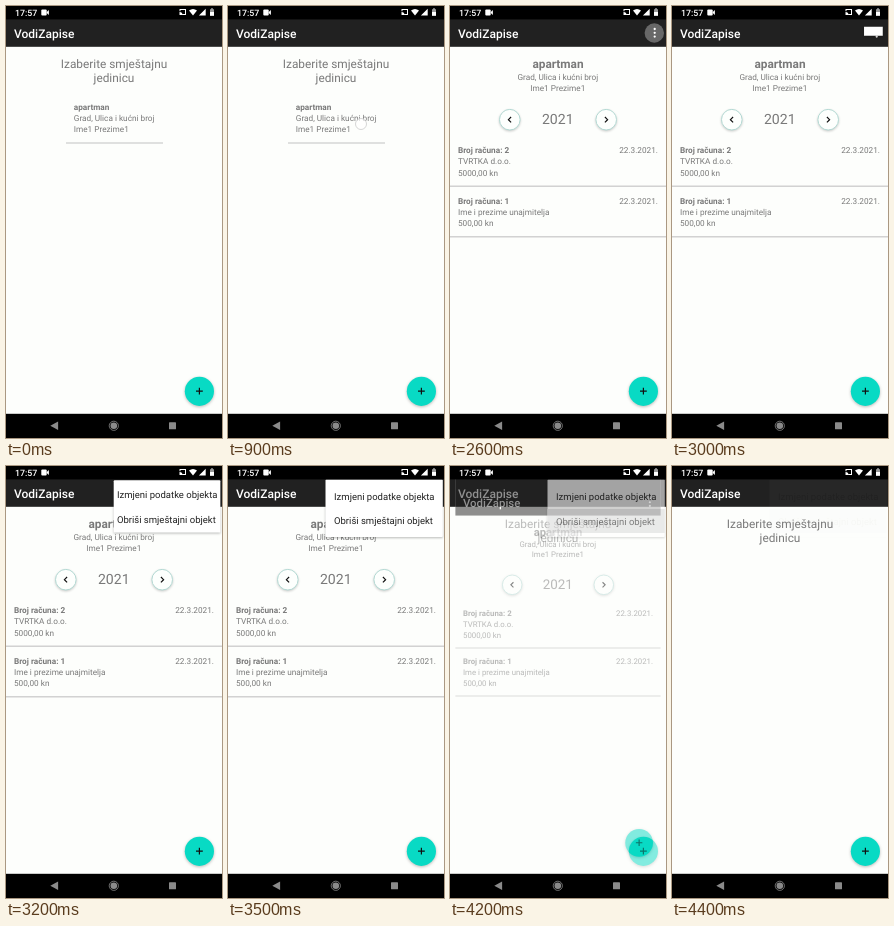
An HTML page that plays this animation: 216x432 px, repeating every 4500 ms.

```html
<!DOCTYPE html>
<html lang="hr">
<head>
<meta charset="utf-8">
<title>VodiZapise</title>
<style>
  html, body { margin: 0; width: 100%; height: 100%; overflow: hidden; background: #000; }
  svg { display: block; width: 100%; height: 100%; }
  text { font: 8.22px Roboto, sans-serif; fill: #797979; text-rendering: geometricPrecision; }
  .bold { font-weight: 700; }
  .mid { text-anchor: middle; }
  .end { text-anchor: end; }
  .big { font-size: 11.85px; }
  .year { font-size: 14.1px; }
  .title { font-size: 12px; font-weight: 500; fill: #fff; }
  .clock { font-size: 8.8px; font-weight: 500; fill: #fff; }
  .option { font-size: 9.5px; fill: #222; }
  .fab { filter: drop-shadow(0 1.5px 1.5px #0004); }
  .round { fill: #fdfffd; stroke: #b3d9d3; filter: drop-shadow(0 1px 1px #0003); }
  .stroke { fill: none; stroke: #111; stroke-width: 1.2; }
  #menu { filter: drop-shadow(0 1px 1px #0004); }
</style>
</head>
<body>
<svg viewBox="0 0 216 432">
  <defs>
    <g id="page">
      <rect width="216" height="432" fill="#fdfefc"/>
      <rect width="216" height="40.8" fill="#212121"/>
      <text class="title" x="8" y="31.5">VodiZapise</text>
    </g>
    <g id="add">
      <circle class="fab" cx="193.4" cy="385.3" r="14.6" fill="#08dac4"/>
      <path class="stroke" d="M190 385.2h6.8M193.4 381.8v6.8"/>
    </g>
    <clipPath id="clip"><rect id="frame" x="97.5" y="13.5" width="117.3" height="57.5" rx="1"/></clipPath>
  </defs>

  <g id="list">
    <use href="#page"/>
    <text class="big mid" x="108" y="62">Izaberite smještajnu</text>
    <text class="big mid" x="108" y="75.7">jedinicu</text>
    <g id="item">
      <text class="bold" x="67.8" y="104">apartman</text>
      <text x="67.8" y="115.3">Grad, Ulica i kućni broj</text>
      <text x="67.8" y="126.4">Ime1 Prezime1</text>
      <rect x="60" y="136.2" width="97" height="1.6" fill="#d9d9d9"/>
    </g>
    <use href="#add"/>
    <circle id="touch" cx="133" cy="118" r="5.5" fill="#fffb" stroke="#ccc" stroke-width=".8"/>
  </g>

  <g id="detail">
    <use href="#page"/>
    <circle id="ripple" cx="204.3" cy="27" r="9.7" fill="#fff"/>
    <g fill="#fff">
      <circle cx="204.7" cy="23" r="1.15"/>
      <circle cx="204.7" cy="26.8" r="1.15"/>
      <circle cx="204.7" cy="30.6" r="1.15"/>
    </g>
    <text class="big bold mid" x="108" y="62">apartman</text>
    <text class="mid" x="107.8" y="73.8">Grad, Ulica i kućni broj</text>
    <text class="mid" x="107.8" y="84.8">Ime1 Prezime1</text>
    <circle class="round" cx="59.8" cy="113.7" r="10.3"/>
    <circle class="round" cx="156.2" cy="113.7" r="10.3"/>
    <path class="stroke" d="M61.1 111l-2.7 2.7 2.7 2.7M154.9 111l2.7 2.7-2.7 2.7"/>
    <text class="year mid" x="107.8" y="118.2">2021</text>
    <text class="bold" x="8" y="147">Broj računa: 2</text>
    <text class="end" x="208" y="147">22.3.2021.</text>
    <text x="8" y="158.3">TVRTKA d.o.o.</text>
    <text x="8" y="169.5">5000,00 kn</text>
    <text class="bold" x="8" y="197.5">Broj računa: 1</text>
    <text class="end" x="208" y="197.5">22.3.2021.</text>
    <text x="8" y="208.7">Ime i prezime unajmitelja</text>
    <text x="8" y="219.8">500,00 kn</text>
    <path d="M0 180.3h216M0 230.8h216" stroke="#d2d2d2" stroke-width="1.5"/>
    <use href="#add"/>
  </g>

  <g id="menu">
    <g clip-path="url(#clip)">
      <rect x="90" y="10" width="126" height="70" fill="#fff"/>
      <g id="options">
        <rect id="press" x="97" y="43" width="119" height="24" fill="#dcdcdc"/>
        <text class="option" x="106" y="34.2">Izmjeni podatke objekta</text>
        <text class="option" x="106" y="58.5">Obriši smještajni objekt</text>
      </g>
    </g>
  </g>

  <rect width="216" height="13.4" fill="#000"/>
  <text class="clock" x="9" y="9.6">17:57</text>
  <g fill="#fff">
    <rect x="35.3" y="3.5" width="5.4" height="6" rx="1"/>
    <path d="M40.7 6l2.2-2v5l-2.2-2z"/>
    <path d="M183 4.5q4-3 8 0l-4 5zM199.7 2.7v6.8h-6.8z"/>
    <path d="M204 3.2h1v-.9h2v.9h1v6.5h-4z" fill="#999"/>
    <path d="M204 6h4v3.7h-4z"/>
    <path d="M173.5 3h6.5v6h-3.5v-1h2.5V4h-4.5v1.3h-1zM173.5 6a3 3 0 0 1 3 3h-3z"/>
  </g>
  <rect y="407.8" width="216" height="25" fill="#000"/>
  <g fill="#8a8a8a">
    <path d="M44.3 419.8l7.8-4.3v8.6z"/>
    <circle cx="107.8" cy="419.8" r="3.3"/>
    <circle cx="107.8" cy="419.8" r="4.6" fill="none" stroke="#8a8a8a" stroke-width=".8"/>
    <rect x="163" y="416.3" width="7" height="7" rx=".6"/>
  </g>
</svg>
<script>
const LOOP = 4500, STEP = 100;
const $ = id => document.getElementById(id);
const ramp = (t, a, b) => Math.min(1, Math.max(0, (t - a) / (b - a)));
const show = (id, alpha) => {
  $(id).style.opacity = alpha;
  $(id).style.display = alpha > 0 ? '' : 'none';
};
const zoom = (id, x, y, s) =>
  $(id).setAttribute('transform', `translate(${x} ${y}) scale(${s}) translate(${-x} ${-y})`);

function draw(t) {
  show('item', t < 3000 ? 1 : 0);
  show('touch', t >= 900 && t < 1300 ? 1 : 0);

  // Page opens by growing and fading in, closes by shrinking and fading out
  const leave = ramp(t, 4050, 4350);
  show('detail', ramp(t, 1250, 1450) * (1 - leave));
  zoom('detail', 108, 216, 1 - .1 * (1 - ramp(t, 1250, 1680)) ** 3 - .1 * leave);

  const grow = ramp(t, 2200, 2500);
  show('ripple', .32 * grow * (1 - ramp(t, 2600, 2850)));
  $('ripple').setAttribute('r', 4 + 5.7 * grow);

  // Menu unfolds from the overflow button
  const rest = (1 - ramp(t, 2980, 3530)) ** 4.7;
  show('menu', t < 3000 ? 0 : 1 - ramp(t, 4050, 4410));
  zoom('frame', 210, 22, 1 - rest);
  $('options').setAttribute('transform', `translate(${54 * rest} ${-22 * rest})`);
  show('press', ramp(t, 3620, 3980));
}

const start = performance.now();
function tick() {
  const t = (performance.now() - start) % LOOP;
  draw(Math.floor(t / STEP) * STEP);
  requestAnimationFrame(tick);
}
tick();
</script>
</body>
</html>
```
